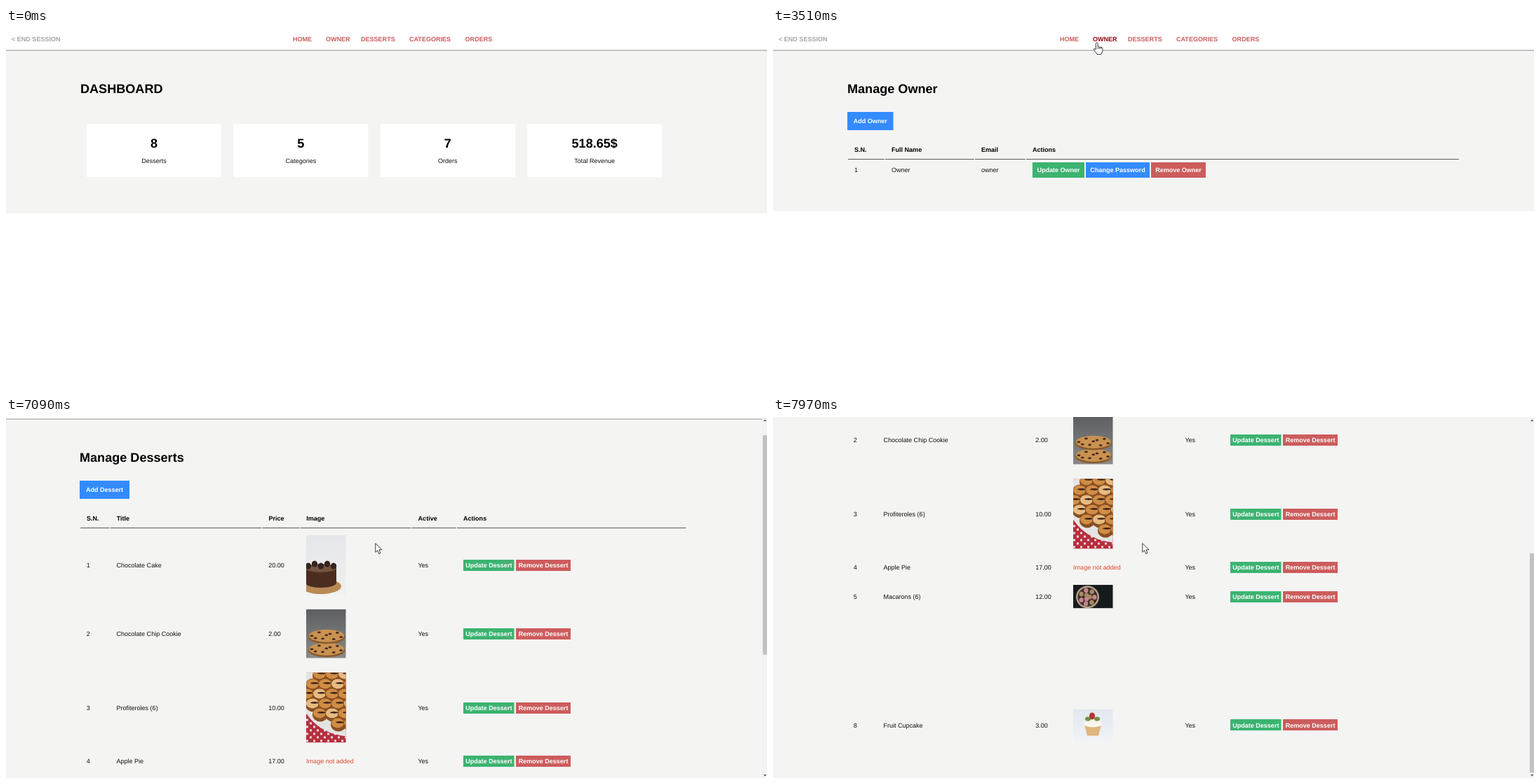
These frames come from a looping animation (1085x516 px, 8 s). An HTML page with a canvas:

```html
<!DOCTYPE html>
<html lang="en">
<head>
<meta charset="utf-8">
<title>Dessert shop dashboard</title>
<style>
  html, body { margin: 0; width: 100%; height: 100%; overflow: hidden; background: #fff; }
  canvas { display: block; width: 1085px; height: 516px; }
</style>
</head>
<body>
<canvas id="stage" width="1085" height="516"></canvas>
<script>
const LOOP = 8000, TICK = 67.5, W = 1085, H = 516;
const OWNER_AT = 2515, DESSERTS_AT = 5070, PHOTOS_AT = 6210;
const GREEN = '#3cb371', BLUE = '#338bff', RED = '#cd5c5c', DARK = '#8b0a10', PANEL = '#f4f4f3';
const SANS = '"Liberation Sans", Arial, sans-serif';
const ctx = document.getElementById('stage').getContext('2d');

const LINKS = [['HOME', 409], ['OWNER', 456], ['DESSERTS', 506], ['CATEGORIES', 575], ['ORDERS', 654.6]];

// Pointer legs: start, end, then where it arrives
const LEGS = [[280, 1080, 392, 53], [1150, 1770, 456, 13], [1770, 1950, 461.5, 20.5],
  [3510, 3920, 499, 9], [3920, 4300, 526.5, 12.8], [5520, 5670, 529, 13.6], [6210, 6850, 526.5, 180.3]];

const clamp = v => Math.min(1, Math.max(0, v));
const ramp = (t, a, b) => clamp((t - a) / (b - a));
const ease = k => k * k * (3 - 2 * k);

function pointerAt(t) {
  let x = 1051, y = 505;
  for (const [a, b, tx, ty] of LEGS) {
    const k = ease(ramp(t, a, b));
    x += (tx - x) * k;
    y += (ty - y) * k;
  }
  return [x, y];
}

// The wheel turns a little faster with every tick, up to the end of the page
function scrollAt(tick) {
  const k = tick - 105;
  return k < 0 ? 0 : Math.min(306, Math.round(29 + 14.4 * k + 0.54 * k * k));
}

function rect(x, y, w, h, fill) {
  ctx.fillStyle = fill;
  ctx.fillRect(x, y, w, h);
}

function oval(x, y, rx, ry, fill) {
  ctx.fillStyle = fill;
  ctx.beginPath();
  ctx.ellipse(x, y, rx, ry, 0, 0, Math.PI * 2);
  ctx.fill();
}

function poly(points, fill, stroke) {
  ctx.beginPath();
  points.forEach(([x, y]) => ctx.lineTo(x, y));
  ctx.closePath();
  ctx.fillStyle = fill;
  ctx.fill();
  if (stroke) {
    ctx.strokeStyle = stroke;
    ctx.stroke();
  }
}

function backdrop(h, top, bottom) {
  const g = ctx.createLinearGradient(0, 0, 0, h);
  g.addColorStop(0, top);
  g.addColorStop(1, bottom);
  rect(0, 0, 57, h, g);
}

// y is the middle of the capitals
function label(s, x, y, { size = 9.04, bold = false, fill = '#111', align = 'left' } = {}) {
  ctx.font = (bold ? 'bold ' : '') + size + 'px ' + SANS;
  ctx.textAlign = align;
  ctx.fillStyle = fill;
  ctx.fillText(s, x, y + size * 0.36);
}

const bold = (s, x, y, fill = '#000') => label(s, x, y, { bold: true, fill });
const title = (s, x) => label(s, x, 86.3, { size: 18.08, bold: true, fill: '#000' });

function button(s, x, y, w, h, fill) {
  rect(x, Math.round(y - h / 2), w, h, fill);
  label(s, x + w / 2, y, { bold: true, fill: '#fff', align: 'center' });
}

function tableHead(names, edges) {
  names.forEach((s, i) => {
    bold(s, edges[i] + 9, 173.5);
    rect(edges[i], 187.2, edges[i + 1] - edges[i] - 1.2, 0.9, '#444');
  });
}

function linkUnder(x, y) {
  ctx.font = 'bold 9.04px ' + SANS;
  return y < 26 ? LINKS.findIndex(([s, a]) => x >= a && x <= a + ctx.measureText(s).width) : -1;
}

function header(hover, shift) {
  rect(0, 31.5, W, 0.9, '#858585');
  bold('< END SESSION', 8, 15.5, '#a5a5a5');
  LINKS.forEach(([s, x], i) => bold(s, x + shift, 15.5, i === hover ? DARK : RED));
}

function dashboard() {
  rect(0, 32, W, 233, PANEL);
  title('DASHBOARD', 106);
  [['8', 'Desserts'], ['5', 'Categories'], ['7', 'Orders'], ['518.65$', 'Total Revenue']].forEach(([n, s], i) => {
    const x = 115 + i * 209.4;
    rect(x, 137, 192, 76, '#fff');
    label(n, x + 96, 164, { size: 18.08, bold: true, fill: '#000', align: 'center' });
    label(s, x + 96, 190, { align: 'center' });
  });
}

function ownerPage() {
  const edges = [107, 160, 288, 361, 979];
  rect(0, 32, W, 229.5, PANEL);
  title('Manage Owner', 106);
  button('Add Owner', 106, 133, 65.5, 26, BLUE);
  tableHead(['S.N.', 'Full Name', 'Email', 'Actions'], edges);
  ['1', 'Owner', 'owner'].forEach((s, i) => label(s, edges[i] + 9, 202.7));
  button('Update Owner', 370, 203, 74, 22, GREEN);
  button('Change Password', 446, 203, 91, 22, BLUE);
  button('Remove Owner', 539, 203, 78, 22, RED);
}

function cake() {
  backdrop(85, '#e4e6e9', '#f0f0f0');
  oval(21, 73, 29, 11, '#b98a55');
  rect(0, 46, 43, 22, '#4b2d20');
  oval(21, 68, 22, 7, '#4b2d20');
  oval(21, 47, 22, 6, '#75533f');
  for (let i = 0; i < 5; i++) oval(3 + i * 9, 44 - (i % 2) * 3, 4.2, 4.6, '#35231e');
}

function cookies() {
  backdrop(70, '#5c5e61', '#8b8a88');
  for (const y of [57, 38]) {
    oval(29, y + 2, 26, 9.5, '#8a5a2c');
    oval(29, y, 25, 9, '#c99250');
    for (let i = 0; i < 9; i++) oval(8 + i * 5.2, y + Math.sin(i * 2.4) * 5, 2.4, 1.5, '#4a2e20');
  }
}

function profiteroles() {
  rect(0, 0, 57, 100, '#b52f3e');
  for (let i = 0; i < 12; i++) for (let j = i % 2; j < 11; j += 2) rect(i * 5, 46 + j * 5, 3, 3, '#f1d5d5');
  oval(62, 24, 72, 67, '#e4e4e3');
  for (let row = 0; row < 6; row++) for (let col = 0; col < 4; col++) {
    const x = 2 + col * 18 + (row % 2) * 8, y = 4 + row * 14;
    if (Math.hypot(x - 62, y - 20) > 62) continue;
    oval(x, y, 11, 10, '#8a4f22');
    oval(x - 1, y - 2, 9, 7, (row + col) % 3 ? '#cf8d45' : '#e6bb82');
    oval(x + 2, y - 3, 6, 1.3, '#3b2018');
  }
}

function macarons() {
  rect(0, 0, 57, 34, '#171b1c');
  oval(20.5, 17.5, 16.5, 16, '#b4a288');
  oval(20.5, 17.5, 14, 13.5, '#392a24');
  for (let i = 0; i < 10; i++) {
    const r = i < 3 ? 3 : 9.8, a = i < 3 ? i * 2.1 : i * 0.9;
    oval(20.5 + Math.cos(a) * r, 17.5 + Math.sin(a) * r, 3.2, 3.5, i % 2 ? '#c4848d' : '#a88763');
  }
}

function cupcake() {
  backdrop(45, '#e3e8f0', '#f0f2f6');
  poly([[16, 23], [40, 23], [36, 38], [20, 38]], '#deb67c');
  oval(28, 21, 13, 5, '#faf8f1');
  oval(28, 16, 9, 5, '#f5f2e7');
  for (const x of [21, 34]) oval(x, 14, 4, 3, '#718f47');
  oval(27, 10, 4, 5, '#b83330');
}

// Name, price, photo height and photo
const DESSERTS = [['Chocolate Cake', '20.00', 85, cake], ['Chocolate Chip Cookie', '2.00', 70, cookies],
  ['Profiteroles (6)', '10.00', 100, profiteroles], ['Apple Pie', '17.00', 10],
  ['Macarons (6)', '12.00', 33.5, macarons], ['Cheesecake', '22.00', 41],
  ['Red Velvet Cake', '18.00', 41], ['Fruit Cupcake', '3.00', 45, cupcake]];

function photo(y, h, paint) {
  ctx.save();
  ctx.translate(428, y);
  ctx.beginPath();
  ctx.rect(0, 0, 56.5, h);
  ctx.clip();
  paint();
  ctx.restore();
}

function dessertPage(loaded) {
  // The scrollbar makes the table a little narrower
  const edges = [107, 150, 368.7, 423, 583.7, 648.7, 979].map(x => loaded ? 106 + (x - 107) * 0.9914 : x);
  const left = edges[0] - 1, act = edges[5] + 9;
  rect(0, 32, W, loaded ? 790 : 431, PANEL);
  title('Manage Desserts', left);
  button('Add Dessert', left, 133, 71, 26, BLUE);
  tableHead(['S.N.', 'Title', 'Price', 'Image', 'Active', 'Actions'], edges);
  let top = 198;
  DESSERTS.forEach(([name, price, h, paint], i) => {
    const y = loaded ? top + h / 2 + 0.5 : 202.7 + i * 28.85;
    const photoTop = top;
    top += h + 20.7;
    if (loaded && (i === 5 || i === 6)) return;
    [i + 1, name, price, i === 3 ? 'Image not added' : '', 'Yes'].forEach((s, c) =>
      label(String(s), edges[c] + 8.8, y, { fill: c === 3 ? '#e0492b' : '#111' }));
    button('Update Dessert', act, y, 72.5, 16, GREEN);
    button('Remove Dessert', act + 75, y, 78, 16, RED);
    if (loaded && paint) photo(photoTop, h, paint);
  });
}

function scrollbar(scroll) {
  rect(1078, 0, 7, H, '#f3f3f3');
  rect(1079, 8.5 + scroll * 0.609, 6, 313.5, '#c1c1c1');
  for (const [y, d] of [[6, -2.5], [511, 2.5]]) poly([[1080, y], [1084.5, y], [1082.2, y + d]], '#555');
}

function statusBar(page, width, alpha) {
  if (!alpha) return;
  ctx.globalAlpha = alpha;
  rect(0, 505.5, width, 10.5, alpha < 0.5 ? '#d5d5d5' : '#d3e3fd');
  ctx.font = '6.5px "Open Sans", "Noto Sans", sans-serif';
  ctx.textAlign = 'left';
  ctx.fillStyle = '#555';
  ctx.fillText('localhost/cherry-on-top/owner/' + page + '.php', 0, 514);
  ctx.globalAlpha = 1;
}

function arrow() {
  poly([[0.3, 0.3], [0.3, 13], [3.2, 10.4], [5.2, 15.2], [7.4, 14.2], [5.4, 9.6], [9.6, 9.4]], '#fff', '#222');
}

function hand() {
  ctx.beginPath();
  ctx.moveTo(-1.5, 10.5);
  ctx.lineTo(-1.5, 2);
  ctx.quadraticCurveTo(0, -1.2, 1.4, 2);
  ctx.lineTo(1.4, 6.3);
  for (const x of [1.4, 3.7, 5.9]) ctx.quadraticCurveTo(x + 1.8, 4.9 + x * 0.22, x + 2.2, 7 + x * 0.2);
  ctx.lineTo(8.1, 12);
  ctx.lineTo(6.3, 17.2);
  ctx.lineTo(0.2, 17.2);
  ctx.quadraticCurveTo(-1.5, 14, -4.2, 10.8);
  ctx.quadraticCurveTo(-4.6, 8.7, -2.8, 9.2);
  ctx.closePath();
  ctx.fillStyle = '#fff';
  ctx.fill();
  for (const x of [1.4, 3.6, 5.8]) {
    ctx.moveTo(x, 7);
    ctx.lineTo(x, 9.5);
  }
  ctx.strokeStyle = '#222';
  ctx.stroke();
}

function draw(t) {
  const tick = Math.floor(t / TICK);
  const [px, py] = pointerAt(tick * TICK + 20);
  const loaded = t >= PHOTOS_AT;
  const scroll = scrollAt(tick);
  const over = linkUnder(px, py);
  const lit = (t >= 2170 && t < OWNER_AT) || (t >= 3510 && t < DESSERTS_AT);

  rect(0, 0, W, H, '#fff');
  ctx.save();
  ctx.translate(0, -scroll);
  if (t < OWNER_AT) dashboard();
  else if (t < DESSERTS_AT) ownerPage();
  else dessertPage(loaded);
  header(lit ? over : -1, loaded ? -4.3 : 0);
  ctx.restore();
  if (loaded) scrollbar(scroll);
  statusBar('owner', 132.5, ramp(t, 2260, 2420) - ramp(t, 2950, 3110));
  statusBar('desserts', 138, ramp(t, 4480, 4580) - ramp(t, 5500, 5700));

  if (t >= 280) {
    ctx.save();
    ctx.translate(px, py);
    ctx.lineWidth = 0.9;
    ctx.lineJoin = 'round';
    if (over >= 0) hand();
    else arrow();
    ctx.restore();
  }
}

if ('textRendering' in ctx) ctx.textRendering = 'geometricPrecision';
const start = performance.now();
function frame() {
  draw((performance.now() - start) % LOOP);
  requestAnimationFrame(frame);
}
frame();
</script>
</body>
</html>
```
